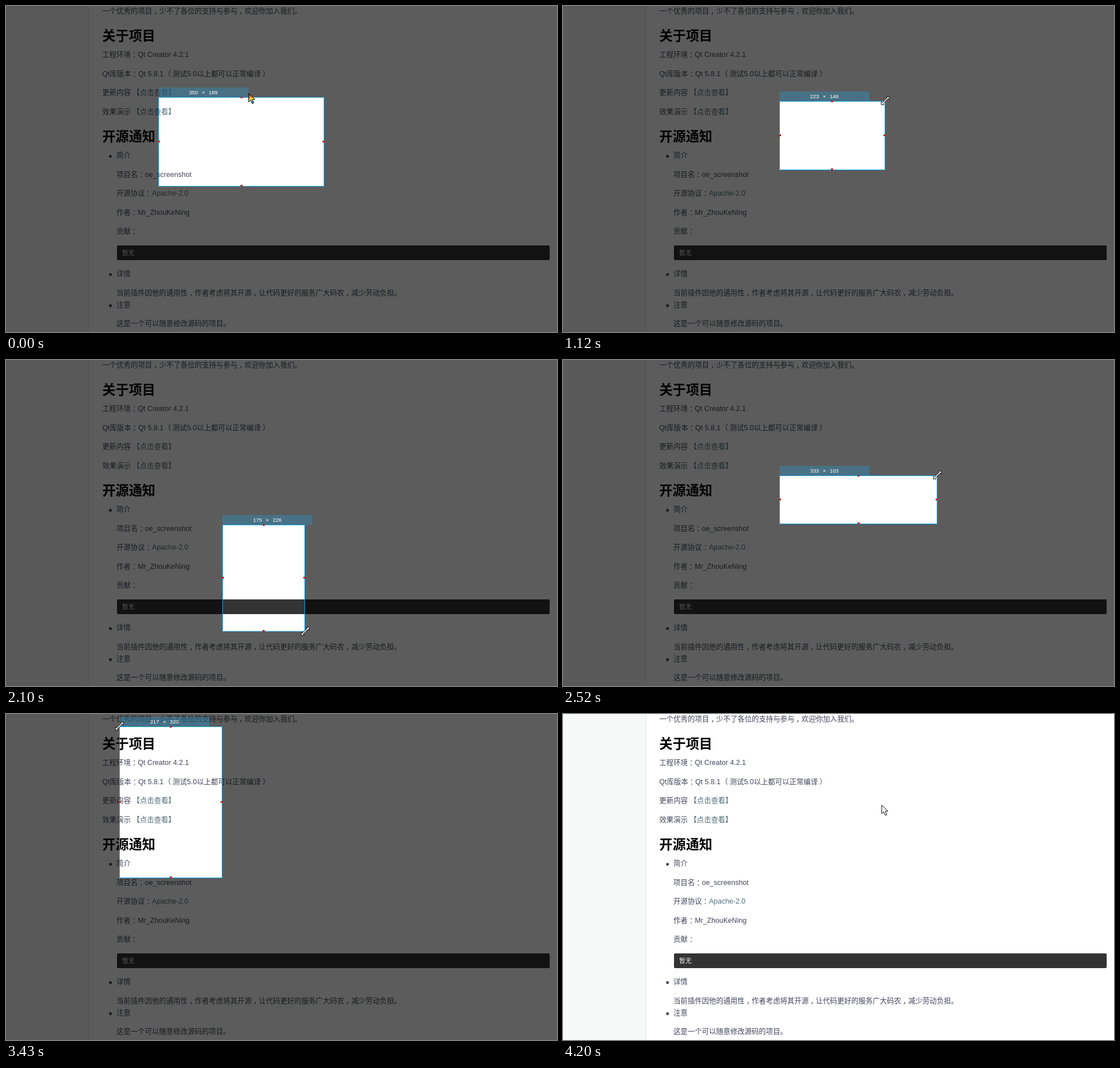
An HTML page that plays this animation: 973 px wide and 576 px high, repeating every 4270 ms.

```html
<!DOCTYPE html>
<html lang="zh-CN">
<head>
<meta charset="utf-8">
<title>截图选区</title>
<style>
html, body { margin: 0; width: 100%; height: 100%; overflow: hidden; background: #fff; }
#stage { position: relative; width: 973px; height: 576px; overflow: hidden;
  font: 12.57px/33.6px "Liberation Sans", "Noto Sans CJK SC", "Noto Sans CJK", sans-serif;
  color: #40475a; white-space: nowrap; text-spacing-trim: space-all; }
#stage > * { position: absolute; }
aside { width: 146px; height: 100%; background: #f7f8f8; border-right: 1px solid #e2e3e3; }
article { left: 170px; top: -6.8px; }
p, h2, ul { margin: 0; padding: 0; }
h2 { padding-top: 9px; font-size: 23.46px; line-height: 34.4px; color: #000; }
ul { padding-left: 25px; list-style: none; }
li { position: relative; }
li::before { content: ""; position: absolute; left: -13px; top: 15px;
  width: 5px; height: 5px; border-radius: 50%; background: #40475a; }
.tight { margin-top: -12.8px; }
.code { width: 755px; margin: 7px 0 8.2px 1px; padding-left: 9px; border-radius: 2px;
  background: #333; color: #eee; font-size: 11px; line-height: 26px; }
a { color: #526e79; }
.mark { position: relative; left: 3px; }
.mark.open { left: -3px; }
#area { box-sizing: border-box; border: 1px solid #12a5ee; border-radius: 2px;
  box-shadow: 0 0 0 1500px rgba(0, 0, 0, .64); }
#area i { position: absolute; width: 4px; height: 3px; margin: -2px; background: #b32626; }
#size { width: 159px; height: 17px; background: rgba(53, 133, 174, .5); color: #fff;
  font-size: 9.5px; line-height: 17px; word-spacing: 4px; text-align: center; }
svg { left: 0; top: 0; }
</style>
</head>
<body>
<div id="stage">
  <aside></aside>
  <article>
    <p>一个优秀的项目，少不了各位的支持与参与，欢迎你加入我们。</p>
    <h2>关于项目</h2>
    <p>工程环境：Qt Creator 4.2.1</p>
    <p>Qt库版本：Qt 5.8.1 （测试5.0以上都可以正常编译）</p>
    <p>更新内容 <a>【点击查看】</a></p>
    <p>效果演示 <a>【点击查看】</a></p>
    <h2>开源通知</h2>
    <ul>
      <li>
        <p>简介</p>
        <p>项目名：oe_screenshot</p>
        <p>开源协议：<a>Apache-2.0</a></p>
        <p>作者：Mr_ZhouKeNing</p>
        <p>贡献：</p>
        <p class="code">暂无</p>
      </li>
      <li>
        <p>详情</p>
        <p>当前插件因他的通用性，作者考虑将其开源，让代码更好的服务广大码农，减少劳动负担。</p>
      </li>
      <li class="tight">
        <p>注意</p>
        <p>这是一个可以随意修改源码的项目。</p>
      </li>
    </ul>
  </article>
  <div id="area">
    <i style="left:50%;top:0"></i><i style="left:50%;top:100%"></i>
    <i style="left:0;top:50%"></i><i style="left:100%;top:50%"></i>
  </div>
  <div id="size"></div>
  <svg width="973" height="576">
    <linearGradient id="warm" x1="0" y1="0" x2=".5" y2="1">
      <stop offset=".15" stop-color="#e3261c"/><stop offset=".45" stop-color="#ff9a1c"/>
      <stop offset=".65" stop-color="#ffe23c"/><stop offset=".9" stop-color="#2b9fa8"/>
    </linearGradient>
    <polygon id="arrow" points="0,0 0,15 3.5,11.7 6.3,18 9,16.8 6.3,10.8 11,10.5" stroke="#000"/>
    <polygon id="resize" points="7,-7 7,-2 5.3,-3.7 -3.7,5.3 -2,7 -7,7 -7,2 -5.3,3.7 3.7,-5.3 2,-7"
      fill="#fff" stroke="#111"/>
  </svg>
</div>
<script>
const $ = id => document.getElementById(id);
const STEP = 70, LOOP = 4270, SCALE = .838, CLOSED = 58;

// Centre the wide punctuation in its cell
for (const p of document.querySelectorAll('p'))
  p.innerHTML = p.innerHTML.replace(/[：，）]/g, '<span class="mark">$&</span>')
    .replace('（', '<span class="mark open">（</span>');

// Key points of the pointer: step, x, y
const path = [
  [0, 428, 154], [2, 562.3, 160.6], [4, 642, 131], [5, 620, 150],       // widen
  [9, 269, 319], [12, 382, 290.5],                                      // pull in the lower left
  [14, 620, 150], [15, 657, 108], [16, 568.9, 168.3], [18, 525, 64],    // swing the upper right
  [20, 879, 322], [22, 298.2, 222.6], [24, 246, 257], [28, 400, 465],
  [32, 640, 440], [36, 661, 204.2], [40, 663, 361], [42, 94.6, 100.3],
  [44, 620, 28], [46, 899, 395], [49, 200.2, 22.3], [51, 136, 60],
  [54, 525, 150], [57, 440, 200], [60, 886, 569]
];

const clamp = (v, lo, hi) => Math.min(hi, Math.max(lo, v));

// Smooth curve through the key points
function pointer(k) {
  const last = path.length - 1;
  const i = clamp(path.findIndex(p => p[0] > k), 1, last);
  const [a, b, c, d] = [-2, -1, 0, 1].map(n => path[clamp(i + n, 0, last)]);
  const span = c[0] - b[0], u = clamp((k - b[0]) / span, 0, 1);
  const slope = (p, q, axis) => (q[axis] - p[axis]) / (q[0] - p[0]) * span;
  return [1, 2].map(axis => {
    const gap = c[axis] - b[axis], m = slope(a, c, axis), n = slope(b, d, axis);
    return b[axis] + u * (m + u * (3 * gap - 2 * m - n + u * (m + n - 2 * gap)));
  });
}

function draw() {
  const now = performance.now() % LOOP;
  const k = now >= CLOSED * STEP && now > LOOP - STEP ? path.at(-1)[0] : Math.floor(now / STEP);
  const open = k < CLOSED;
  const [ax, ay] = pointer(clamp(k, 9, 12));
  const [cx, cy] = pointer(k < 14 ? clamp(k, 2, 5) : k);
  const x = Math.min(ax, cx), y = Math.min(ay, cy);
  const w = Math.abs(ax - cx), h = Math.abs(ay - cy);
  Object.assign($('area').style,
    { left: x + 'px', top: y + 'px', width: w + 'px', height: h + 'px', display: open ? '' : 'none' });
  Object.assign($('size').style,
    { left: x + 'px', top: y - 17 + 'px', display: open ? '' : 'none' });
  $('size').textContent = `${Math.round(w / SCALE)} × ${Math.round(h / SCALE)}`;

  const dragging = open && (k >= 14 || k >= 2 && k <= 5 || k >= 9 && k <= 12);
  const [px, py] = pointer(k);
  $('arrow').style.display = dragging ? 'none' : '';
  $('resize').style.display = dragging ? '' : 'none';
  $('arrow').setAttribute('fill', open ? 'url(#warm)' : '#fff');
  $('arrow').setAttribute('transform', `translate(${px + .5} ${py + .5})`);
  $('resize').setAttribute('transform', `translate(${px} ${py - 1})`);
  requestAnimationFrame(draw);
}
draw();
</script>
</body>
</html>
```
